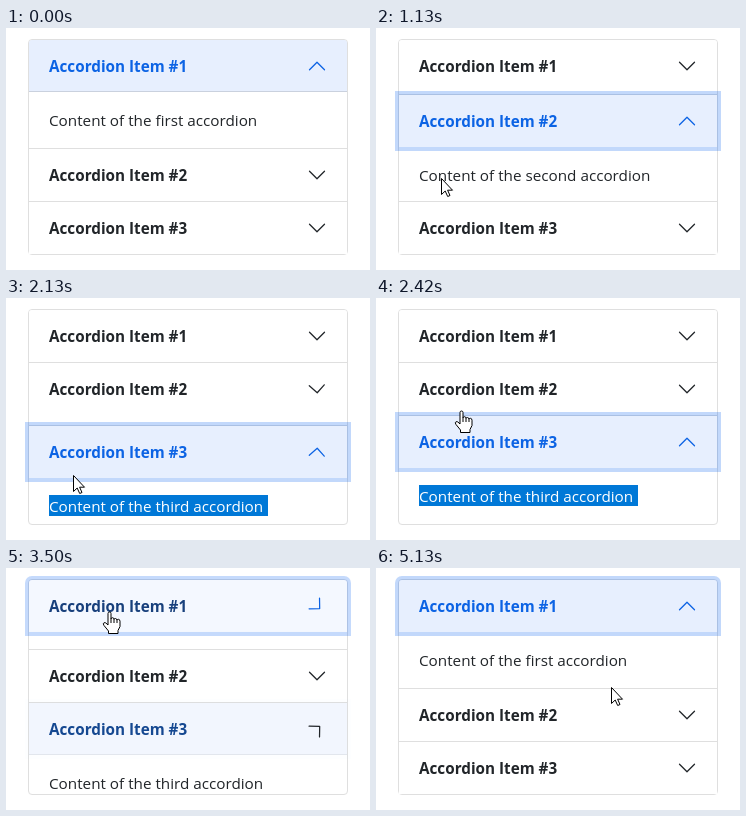
An HTML page that plays this animation: 364x242 px, repeating every 5.21 s.

```html
<!DOCTYPE html>
<html lang="en">
<head>
<meta charset="utf-8">
<title>Accordion</title>
<style>
html, body { margin: 0; width: 100%; height: 100%; overflow: hidden; background: #fff; }
body { position: relative; font: 15.25px "Open Sans", sans-serif; color: #212529; white-space: nowrap; }
* { box-sizing: border-box; }
#accordion { position: absolute; left: 22px; top: 11px; width: 320px; height: 216px; border: 1px solid #dfdfdf; border-radius: 4px; }
.item + .item { border-top: 1px solid #dfdfdf; }
.head {
  position: relative; height: 52px; padding-left: 20px; line-height: 53px; font-weight: 700;
  --share: calc(var(--on) * 100%);
  color: color-mix(in srgb, #0c63e4 var(--share), #212529);
  background: color-mix(in srgb, #e7effe var(--share), #fff);
  box-shadow: inset 0 -1px rgba(0, 0, 0, calc(.125 * var(--on) * (1 - var(--ring)))),
              0 0 0 4px rgba(13, 100, 240, calc(.25 * var(--ring)));
}
.item:first-child .head { border-radius: 3px 3px 0 0; }
.body { overflow: hidden; padding-left: 20px; }
.body span { display: block; width: max-content; height: 21px; margin-top: 17px; padding-right: 5px; line-height: 22px; }
.selected { background: #0078d7; color: #fff; }
.head svg { position: absolute; right: 20px; top: 16px; width: 20px; height: 20px; fill: none; stroke-linecap: round; stroke-linejoin: round; }
#pointer { position: absolute; z-index: 2; inset: 0; width: 364px; height: 242px; fill: #fff; stroke: #000; stroke-linejoin: round; }
</style>
</head>
<body>
<div id="accordion"></div>
<svg id="pointer"><path/></svg>
<script>
const LOOP = 5210;
const BODY_HEIGHT = 56;
const PRESS_LEAD = 60; // focus arrives on press, the panel opens on release
const TICKS = [0, 130, 210, 340, 420];
const CLICKS = [{ at: -1e4, item: 0 }, { at: 862, item: 1 }, { at: 1950, item: 2 }, { at: 3430, item: 0 }];
const TRACK = [ // time, x, y of the pointer tip
  [130, -14, 205], [700, 65, 150], [1200, 65, 150], [1480, 66, 180], [2080, 66, 180],
  [2420, 86, 113], [2900, 104, 44], [4300, 104, 44], [4780, 235, 119], [LOOP, 235, 119]
];
const ARROW = 'M.5 .5V16.5L4.2 13 6.7 18.5 9 17.5 6.6 12.2H11.5Z';
const HAND = 'M-2 13V1.5Q-2 0-.5 0T1 1.5V7Q1 5.7 2.5 5.7T4 7.5Q4 6.5 5.4 6.5T7 8.3Q7 7.3 8.4 7.3T10 9.2V14.5' +
  'L8 18.5V21.5H-1.5V19L-6 13.5Q-7.5 11.5-6 10.7T-2 13ZM1 7V11M4 7.5V11M7 8.3V11';

const accordion = document.getElementById('accordion');
const pointer = document.querySelector('#pointer path');

const items = ['first', 'second', 'third'].map((word, i) => {
  const el = document.createElement('div');
  el.className = 'item';
  el.innerHTML = `<div class="head">Accordion Item #${i + 1}<svg viewBox="0 0 16 16"><path d="M2 5L8 11 14 5"/></svg></div>
    <div class="body"><span>Content of the ${word} accordion</span></div>`;
  accordion.append(el);
  const [head, icon, body, text] = ['.head', 'svg', '.body', 'span'].map(s => el.querySelector(s));
  return { head, icon, body, text };
});

function bezier(x1, y1, x2, y2) {
  const curve = (a, b, s) => 3 * a * s * (1 - s) ** 2 + 3 * b * s * s * (1 - s) + s ** 3;
  return x => {
    if (x >= 1) return 1;
    let lo = 0, hi = 1;
    for (let n = 0; n < 24; n++) {
      const mid = (lo + hi) / 2;
      if (curve(x1, x2, mid) < x) lo = mid; else hi = mid;
    }
    return curve(y1, y2, lo);
  };
}
const ease = bezier(.25, .1, .25, 1);
const easeInOut = bezier(.42, 0, .58, 1);

const lastClick = t => CLICKS.findLastIndex(c => c.at <= t);

// How far item i is switched on at time t, from 0 to 1.
function level(t, i, curve, ms) {
  const k = lastClick(t);
  const v = curve((t - CLICKS[k].at) / ms);
  return i === CLICKS[k].item ? v : i === CLICKS[k - 1]?.item ? 1 - v : 0;
}

function drawItems(t, open) {
  const pressTime = t + PRESS_LEAD;
  items.forEach(({ head, icon, body, text }, i) => {
    const everFocused = CLICKS.some(c => c.item === i && c.at > 0 && c.at <= pressTime);
    const ring = everFocused ? level(pressTime, i, easeInOut, 150) : 0;
    head.style.setProperty('--on', level(t, i, easeInOut, 150));
    head.style.setProperty('--ring', ring);
    head.style.zIndex = ring > 0 ? 1 : 0;
    icon.style.transform = `rotate(${-180 * level(t, i, easeInOut, 200)}deg)`;
    icon.style.stroke = i === open ? '#0c63e4' : '#212529';
    body.style.height = BODY_HEIGHT * level(t, i, ease, 350) + 'px';
    text.className = i === 2 && open === 2 ? 'selected' : '';
  });
}

function drawPointer(t, open) {
  const n = Math.max(1, TRACK.findIndex(p => p[0] > t));
  const [t0, x0, y0] = TRACK[n - 1], [t1, x1, y1] = TRACK[n];
  const v = easeInOut(Math.max(0, (t - t0) / (t1 - t0)));
  const x = Math.round(x0 + (x1 - x0) * v), y = Math.round(y0 + (y1 - y0) * v);
  const overHead = x > 22 && items.some((_, i) => {
    const top = 12 + 53 * i + (i > open ? BODY_HEIGHT : 0);
    return y >= top && y < top + 52;
  });
  pointer.setAttribute('d', overHead ? HAND : ARROW);
  pointer.setAttribute('transform', `translate(${x} ${y})`);
}

function frame() {
  const now = performance.now() % LOOP;
  const t = now - now % 500 + TICKS.findLast(tick => tick <= now % 500);
  const open = CLICKS[lastClick(t)].item;
  drawItems(t, open);
  drawPointer(t, open);
  requestAnimationFrame(frame);
}
frame();
</script>
</body>
</html>
```
